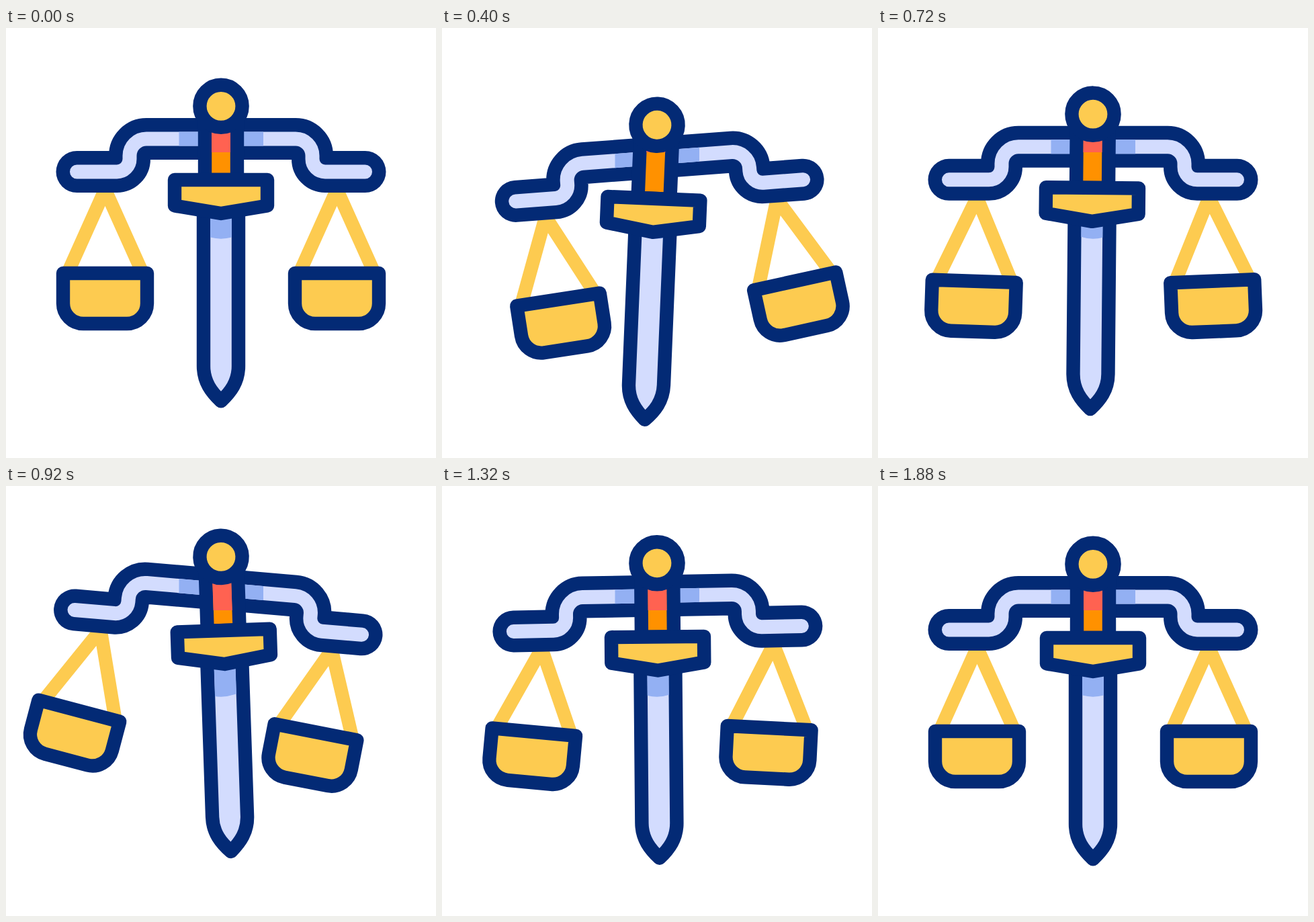
An HTML page for the animation above (2000 ms loop, 640x640 px).

```html
<!DOCTYPE html>
<html lang="en">
<head>
<meta charset="utf-8">
<title>Scales of justice</title>
<style>
  html, body { margin: 0; width: 100%; height: 100%; overflow: hidden; background: #fff; }
  svg { display: block; width: 100vw; height: 100vh; }
  .line { stroke: #032a75; stroke-width: 20.4; stroke-linejoin: round; }
  .gold { fill: #fdcb50; }
  .steel { fill: #d3dcfe; }
  .grip { fill: #ff9100; }
  .shade { fill: #93b0f3; }
  .ember { fill: #ff6251; }
  .string { fill: none; stroke: #fdcb50; stroke-width: 20; }
  .rod { fill: none; stroke-linecap: round; }
</style>
</head>
<body>
<svg viewBox="0 0 640 640">
  <defs>
    <g id="pan">
      <path class="string" d="M88 373L147.5 240.5L207 373"/>
      <path class="line gold" d="M85 365H210V410A30 30 0 0 1 180 440H115A30 30 0 0 1 85 410Z"/>
    </g>
    <path id="rod" d="M105.5 214H165A19 19 0 0 0 184 195V190A25 25 0 0 1 209 165
      H431A25 25 0 0 1 456 190V195A19 19 0 0 0 475 214H534.5"/>
    <!-- The shades stay still; only the windows they show through move. -->
    <clipPath id="beamClip"><rect class="beam" x="209" y="154.5" width="222" height="21"/></clipPath>
    <clipPath id="gripClip"><rect class="sword" x="306" y="116" width="28" height="110"/></clipPath>
    <clipPath id="bladeClip"><rect class="sword" x="304" y="260" width="32" height="240"/></clipPath>
  </defs>

  <g class="beam">
    <g class="left"><use href="#pan"/></g>
    <g transform="translate(345 0)"><g class="right"><use href="#pan"/></g></g>
    <use href="#rod" class="rod" stroke="#032a75" stroke-width="62"/>
    <use href="#rod" class="rod" stroke="#d3dcfe" stroke-width="21"/>
  </g>
  <g clip-path="url(#beamClip)"><rect class="shade" x="257.5" y="100" width="125.5" height="140"/></g>

  <g class="sword">
    <path class="line grip" d="M296 120H344V226H296Z"/>
    <path class="line steel" d="M294 260V503C294 527 306 542 320 555.3C334 542 346 527 346 503V260Z"/>
  </g>
  <g clip-path="url(#gripClip)"><rect class="ember" x="280" y="90" width="80" height="95"/></g>
  <g clip-path="url(#bladeClip)"><path class="shade" d="M280 220H360V303.6L340 310.3Q320 317 300 310.3L280 303.6Z"/></g>

  <g class="sword">
    <path class="line gold" d="M251 226H389V264.5L320 276L251 264.5Z"/>
    <circle class="line gold" cx="320" cy="116.3" r="31.6"/>
  </g>
</svg>
<script>
  const LOOP = 2000, STEP = 40;

  // [time in ms, value], eased in and out between neighbours
  const tracks = {
    lift:  [[80, 0], [505, 33], [950, -11.5], [1428, 0]],
    beam:  [[80, 0], [498, -5], [942, 5], [1433, -2], [1870, 0]],
    sword: [[80, 0], [505, 2.8], [950, -2], [1500, 0]],
    left:  [[80, 0], [510, -5.3], [950, 10.1], [1845, 0]],
    right: [[80, 0], [512, -9.7], [950, 6.3], [1845, 0]]
  };

  const parts = {};
  for (const name of ['beam', 'sword', 'left', 'right'])
    parts[name] = document.querySelectorAll('.' + name);

  function valueAt(track, t) {
    const next = track.findIndex(key => key[0] > t);
    if (next < 1) return 0;
    const [t0, a] = track[next - 1], [t1, b] = track[next];
    const p = (t - t0) / (t1 - t0);
    return a + (b - a) * p * p * (3 - 2 * p);
  }

  function place(name, t, x, y, lift) {
    const turn = valueAt(tracks[name], t);
    for (const el of parts[name])
      el.setAttribute('transform', `translate(0 ${lift}) rotate(${turn} ${x} ${y})`);
  }

  function draw(now) {
    const t = Math.floor((now % LOOP) / STEP) * STEP;
    const lift = valueAt(tracks.lift, t);
    place('beam', t, 320, 165, lift);
    place('sword', t, 320, 116.3, lift);
    place('left', t, 147.5, 235, 0);
    place('right', t, 147.5, 235, 0);
  }

  const start = performance.now();
  function tick() {
    draw(performance.now() - start);
    requestAnimationFrame(tick);
  }
  tick();
</script>
</body>
</html>
```
